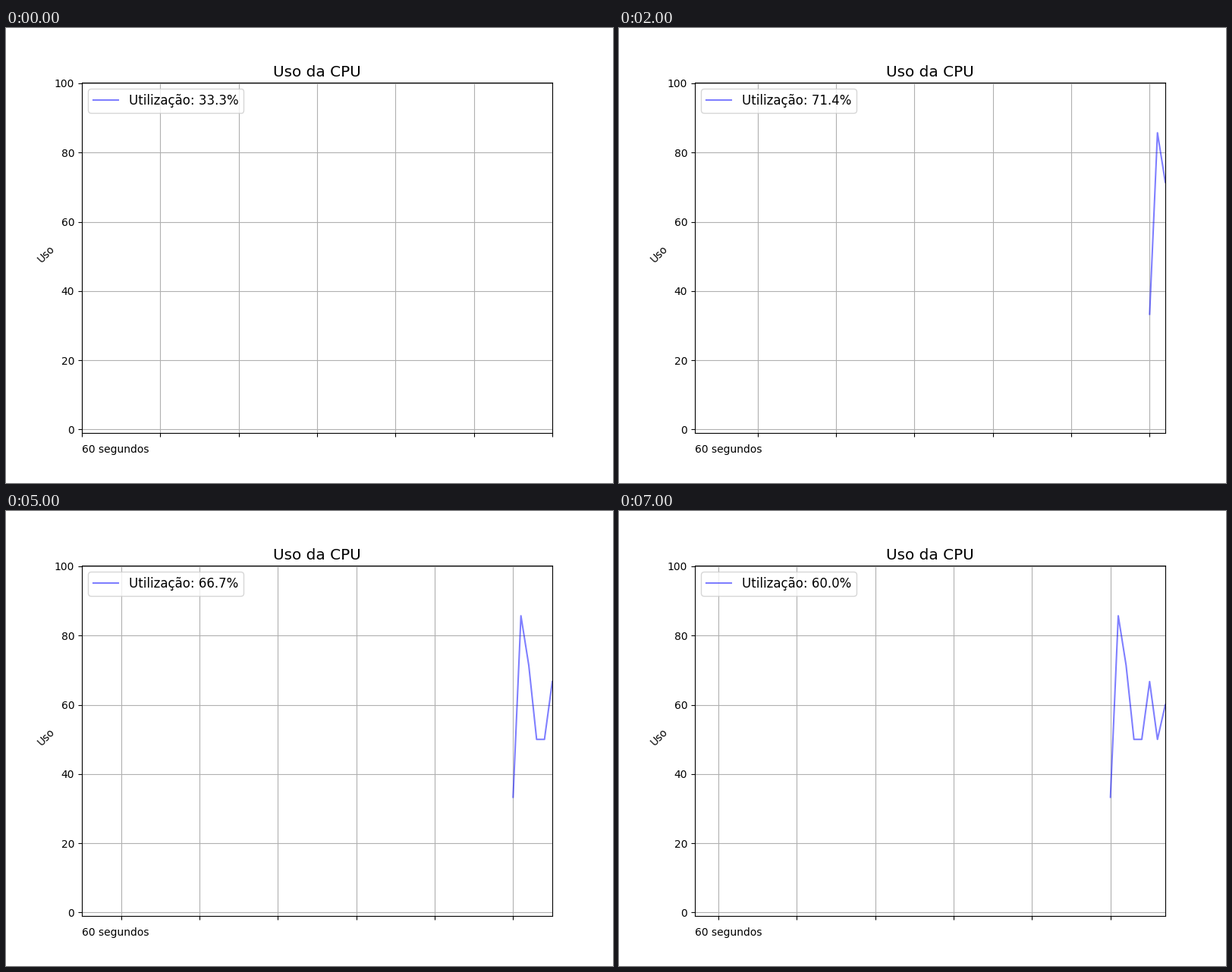
Recreate the animation shown at these times as a matplotlib script. Size 800 by 600 pixels, loop 8000 ms.

```python
import matplotlib.pyplot as plt
from matplotlib.animation import FuncAnimation
from matplotlib.ticker import MultipleLocator

WINDOW = 60
USAGE = [33.3, 85.7, 71.4, 50.0, 50.0, 66.7, 50.0, 60.0]

plt.rcParams["font.family"] = "DejaVu Sans"
fig, ax = plt.subplots(figsize=(8, 6), dpi=100)

ax.set_title("Uso da CPU", fontsize="x-large")
ax.set_ylabel("Uso", rotation=45)
ax.set_ylim(-1, 100.2)
ax.xaxis.set_major_locator(MultipleLocator(10))
ax.yaxis.set_major_locator(MultipleLocator(20))
ax.tick_params(axis="x", labelbottom=False)
ax.grid(True)
fig.text(100 / 800, 40 / 600, f"{WINDOW} segundos", fontsize=10)

line, = ax.plot([], [], color="blue", alpha=0.5, linewidth=1.5)
legend = ax.legend([line], [f"Utilização: {USAGE[0]:.1f}%"],
                   loc="upper left", fontsize="large")
label = legend.get_texts()[0]


def update(second):
    """Show the samples so far, with the newest at the right edge."""
    line.set_data(range(second + 1), USAGE[:second + 1])
    ax.set_xlim(second - WINDOW, second)
    label.set_text(f"Utilização: {USAGE[second]:.1f}%")
    return line, label


anim = FuncAnimation(fig, update, frames=len(USAGE), interval=1000,
                     init_func=lambda: update(0), repeat=True,
                     repeat_delay=0, blit=False)
plt.show()
```
